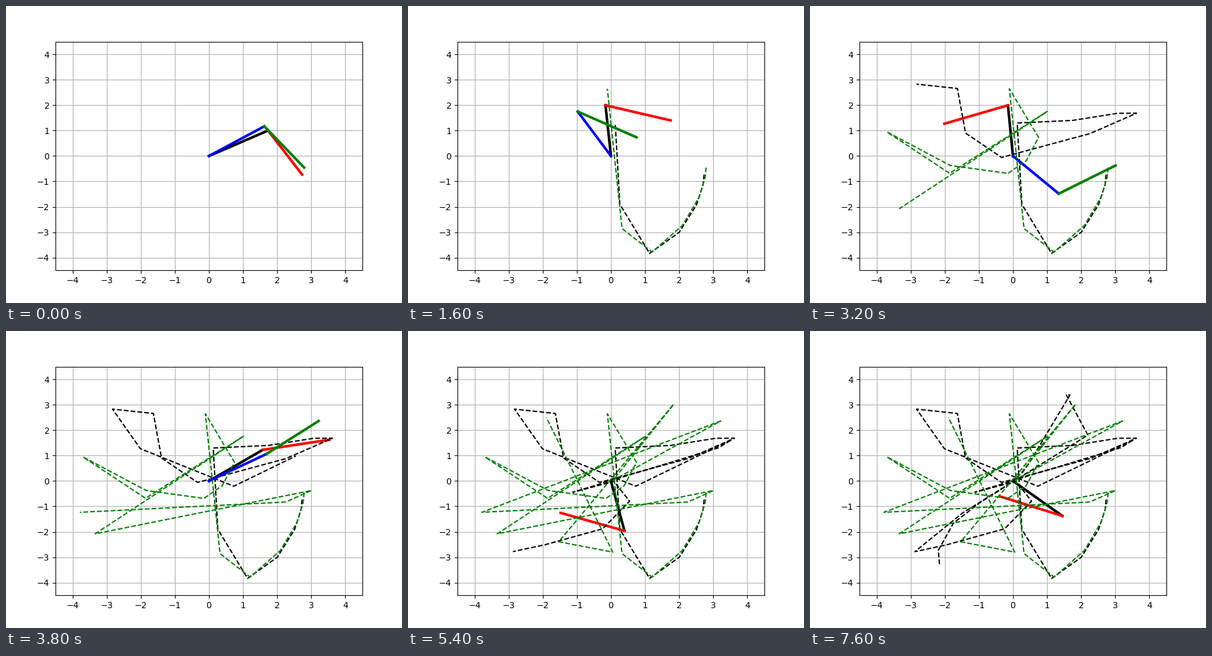
Write a matplotlib script that moves like this. It is 640x480 px and loops after 7.8 s.

```python
import numpy as np
import matplotlib.pyplot as plt
from matplotlib.animation import FuncAnimation

G, L, DT, STEPS = 9.81, 2.0, 0.2, 39


def accel(a, b, wa, wb):
    """Angular accelerations of two equal masses on equal rods."""
    d = a - b
    den = L * (3 - np.cos(2 * d))
    acc_a = (-3 * G * np.sin(a) - G * np.sin(a - 2 * b)
             - 2 * np.sin(d) * (wb**2 * L + wa**2 * L * np.cos(d))) / den
    acc_b = 2 * np.sin(d) * (2 * wa**2 * L + 2 * G * np.cos(a)
                             + wb**2 * L * np.cos(d)) / den
    return acc_a, acc_b


def simulate(a, b):
    """Explicit Euler steps; returns the elbow and tip at each step."""
    pos = np.array([a, b])
    vel = np.zeros(2)
    elbow, tip = [], []
    with np.errstate(all="ignore"):
        for _ in range(STEPS):
            rods = L * np.column_stack([np.sin(pos), -np.cos(pos)])
            elbow.append(rods[0])
            tip.append(rods[0] + rods[1])
            acc = np.array(accel(*pos, *vel))
            pos, vel = pos + DT * vel, vel + DT * acc
    return np.array(elbow), np.array(tip)


fig, ax = plt.subplots(figsize=(6.4, 4.8), dpi=100)
ax.set_xlim(-4.5, 4.5)
ax.set_ylim(-4.5, 4.5)
ax.grid()


class Pendulum:
    def __init__(self, a, b, upper, lower, trail):
        self.elbow, self.tip = simulate(a, b)
        self.upper, = ax.plot([], [], color=upper, lw=3)
        self.lower, = ax.plot([], [], color=lower, lw=3)
        self.trail, = ax.plot([], [], "--", color=trail)

    def show(self, i):
        elbow, tip = self.elbow[i], self.tip[i]
        self.upper.set_data([0, elbow[0]], [0, elbow[1]])
        self.lower.set_data([elbow[0], tip[0]], [elbow[1], tip[1]])
        self.trail.set_data(self.tip[:i, 0], self.tip[:i, 1])
        return self.upper, self.lower, self.trail


START = np.radians([120, 30])
pendulums = [Pendulum(*START, "k", "r", "k"),
             Pendulum(*(START + 0.1), "b", "g", "g")]


def draw(i):
    return [line for p in pendulums for line in p.show(i)]


anim = FuncAnimation(fig, draw, frames=STEPS, interval=1000 * DT, repeat=True)
plt.show()
```
